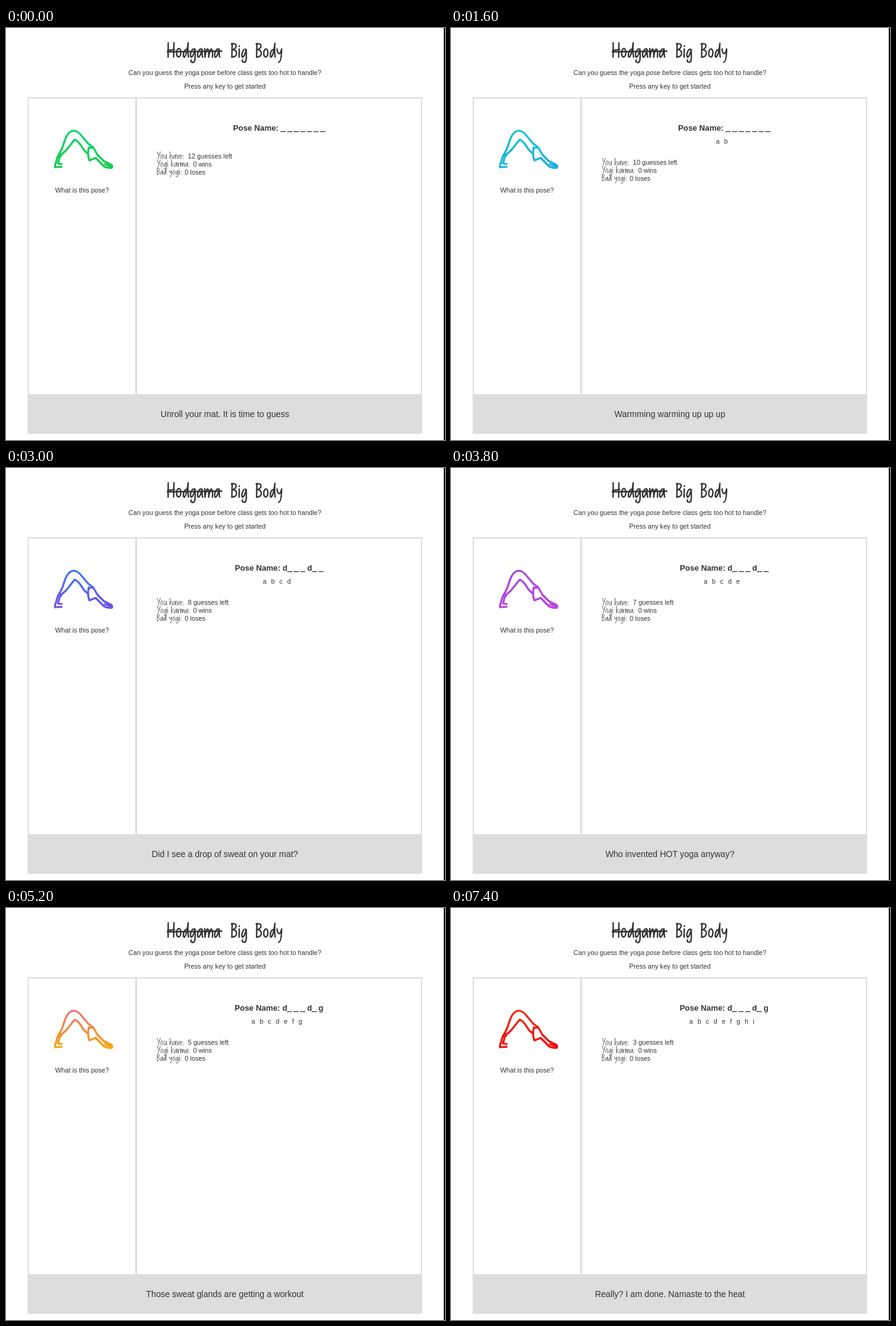
An HTML page that plays this animation: 710x666 px, repeating every 8 s.

```html
<!DOCTYPE html>
<html lang="en">
<head>
<meta charset="utf-8">
<title>Pose guessing game</title>
<style>
  html, body { margin: 0; width: 100%; height: 100%; overflow: hidden; background: #fff; }
  svg { display: block; width: 100vw; height: 100vh; }
  text { font: 10.63px "Liberation Sans", Arial, sans-serif; fill: #333; }
  .mid { text-anchor: middle; }
  .pose { font-size: 12.86px; font-weight: bold; }
  .blank { stroke: #333; stroke-width: .8; }
  .tried { word-spacing: 4.45px; }
  .note { font-size: 13.78px; }
  .line { fill: none; stroke-linecap: round; stroke-linejoin: round; }
  .hand path { vector-effect: non-scaling-stroke; }
  .title { stroke: #333; stroke-width: 2.3; }
  .label { stroke: #444; stroke-width: .85; }
  .figure { stroke: url(#heat); stroke-width: 3.2; }
</style>
</head>
<body>
<svg viewBox="0 0 710 666">
  <defs>
    <linearGradient id="heat" gradientUnits="userSpaceOnUse" x1="0" y1="165" x2="0" y2="227">
      <stop id="top" offset="0"/>
      <stop id="bottom" offset="1"/>
    </linearGradient>
  </defs>

  <g id="heading" class="line hand title"></g>
  <path class="line title" d="M261 38.5L349 37.5"/>
  <text class="mid" x="354" y="76">Can you guess the yoga pose before class gets too hot to handle?</text>
  <text class="mid" x="354" y="98">Press any key to get started</text>

  <path fill="#ddd" fill-rule="evenodd" d="M35 112H673V656H35ZM37 114V592H209V114ZM212 114V592H671V114Z"/>
  <rect x="708" width="2" height="666"/>

  <g class="line figure">
    <path d="M79.500 225Q78.500 222 81 217Q83 207 87 202Q92 193 95 182Q100 167 109 166Q116 166 122 174L133 187L141 193L148 205L158 215L170 221Q173 223 171 226Q166 227 159 224L145 210L135 214Q131 205 134 193"/>
    <path d="M133 203Q127 200 122 191Q116 182 111 180.500L97 198L87 207Q86 214 84 219L90 220M87 202L89 207M79.500 225L90 224.500M141 193L134 194M160 220L170 224"/>
  </g>
  <text class="mid" x="123" y="266">What is this pose?</text>

  <text id="pose" class="mid pose" x="441.600" y="166"></text>
  <text id="tried" class="mid tried" x="438" y="187"></text>
  <g id="score">
    <g id="labels" class="line hand label"></g>
    <text id="left" x="294.300" y="211"></text>
    <text x="302.700" y="223.700">0 wins</text>
    <text x="289" y="236.500">0 loses</text>
  </g>
  <text id="note" class="mid note" x="354" y="629.300"></text>
</svg>

<script>
const $ = id => document.getElementById(id);

// Handwriting: advance width and pen strokes, cap height 10, baseline 0
const pen = {
  ' ': [3.5, ''],
  ':': [2, 'M.8-4.4v.4M.8-.8v.4'],
  B: [5.2, 'M.8-10L.6 0M.3-9.600C5-11 4.600-6 1-5.400C5.400-5.600 5 .2 .5 0'],
  H: [5.8, 'M.6-10L.5 0M4.600-10L4.400 0M.2-4.600L5-5.400'],
  Y: [5, 'M.3-10L2.600-5M5-10L2 .2'],
  a: [5, 'M3.600-5.400C1.500-7 0-2 .6-.4S3-2 3.600-5.600Q3.400-2 4 0'],
  d: [5, 'M3.400-5C1.600-7 0-2 .6-.4S3-2 3.800-10Q3.400-3 4.100 0'],
  e: [4.5, 'M.5-3L3.300-3.600C3.200-7 .4-6 .5-2.500S2.400 .2 3.800-1'],
  g: [5, 'M3.600-5.400C1.500-7 0-2 .6-.4S3-2 3.600-5.600C4 2 3.600 4 2 3.800S.6 2.600 1 2'],
  h: [5, 'M.6-10L.4 0Q1.600-6 3-5.500T3.600 0'],
  i: [2.3, 'M.8-6L.7 0M.9-8.200v.4'],
  k: [4.7, 'M.6-10L.5 0M3.600-6L.8-2.800L4 0'],
  m: [7, 'M.5-6L.6 0Q1.600-6 2.600-5.600T3.200 0Q4.200-6 5.200-5.600T5.900 0'],
  o: [5, 'M2.600-6C.2-6 0-.2 2-.1S4.400-6 2.200-6'],
  r: [4, 'M.5-6L.7 0Q1.400-6 3.400-5.400'],
  u: [5, 'M.4-6C.3-2 .8 0 2 0S3.600-3 3.800-6Q3.500-2 4.200 0'],
  v: [4.3, 'M.3-6L1.700 0L3.700-6'],
  y: [5, 'M.4-6Q.8-2.400 2-2.600T3.800-6Q3.600 3.800 1.600 3.800']
};

function write(parent, words, x, y, scale) {
  let strokes = '', at = 0;
  for (const c of words) {
    const [advance, d] = pen[c];
    strokes += `<path transform="translate(${at})" d="${d}"/>`;
    at += advance;
  }
  parent.insertAdjacentHTML('beforeend',
    `<g role="img" aria-label="${words}" transform="translate(${x} ${y}) scale(${scale})">${strokes}</g>`);
}

write($('heading'), 'Hodgama', 261, 47, 2.3);
write($('heading'), 'Big', 364, 47, 2.2);
write($('heading'), 'Body', 404, 47, 2.2);
write($('labels'), 'You have:', 244, 211.3, 1.12);
write($('labels'), 'Yogi karma:', 244, 224, 1.1);
write($('labels'), 'Bad yogi:', 244, 236.7, 1.06);

const answer = 'downdog';
const guessTimes = [700, 1600, 2400, 3000, 3800, 4500, 5200, 6600, 7400];
const notes = [
  'Unroll your mat. It is time to guess',
  'Warmming warming up up up',
  'Did I see a drop of sweat on your mat?',
  'Who invented HOT yoga anyway?',
  'Those sweat glands are getting a workout',
  'Really? I am done. Namaste to the heat'
];
const noteFor = [0, 1, 1, 2, 2, 3, 3, 4, 5, 5];
// Top and bottom colour of the figure after each guess
const heat = [
  ['#0cd468', '#14cc50'], ['#12cc9c', '#10ccb4'], ['#14c4d0', '#18b0e0'],
  ['#14b0ee', '#3c6ce4'], ['#3c78f0', '#7050e4'], ['#a048e4', '#c040e0'],
  ['#d848c8', '#f06090'], ['#ee7078', '#f8a408'], ['#f87820', '#f85010'],
  ['#f82810', '#f00c0c']
];

let shown = -1;
function show(n) {
  shown = n;
  const tried = 'abcdefghi'.slice(0, n);
  const blank = '<tspan class="blank">_</tspan> ';
  $('pose').innerHTML = 'Pose Name: ' +
    [...answer].map(c => tried.includes(c) ? c : blank).join('').trim();
  $('tried').textContent = [...tried].join(' ');
  $('left').textContent = `${12 - n} guesses left`;
  $('score').setAttribute('transform', `translate(0 ${n ? 10.3 : 0})`);
  $('note').textContent = notes[noteFor[n]];
  $('top').setAttribute('stop-color', heat[n][0]);
  $('bottom').setAttribute('stop-color', heat[n][1]);
}

function tick() {
  const t = performance.now() % 8000;
  const n = guessTimes.filter(g => g <= t).length;
  if (n !== shown) show(n);
  requestAnimationFrame(tick);
}
tick();
</script>
</body>
</html>
```
